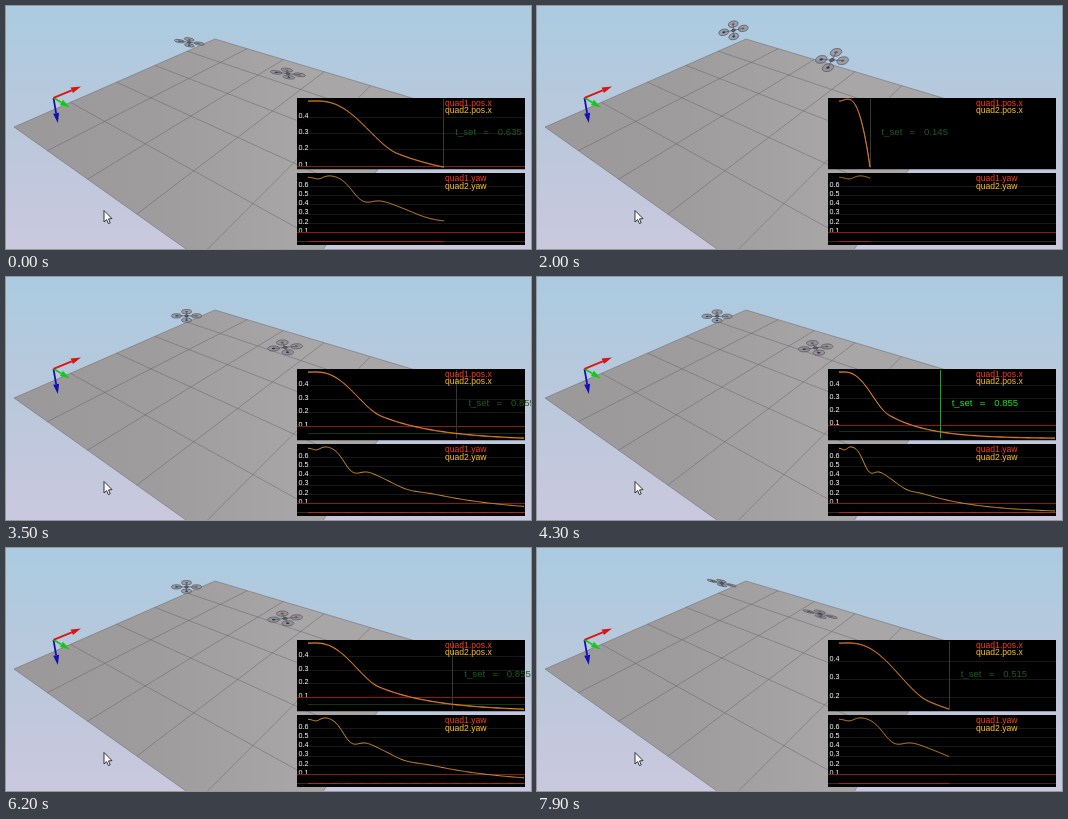
Recreate the animation shown at these times as an HTML page with a canvas. Size 525 by 243 pixels, loop 8000 ms.

```html
<!DOCTYPE html>
<html>
<head>
<meta charset="utf-8">
<title>Quadrotor step response</title>
<style>
html, body { margin: 0; width: 100%; height: 100%; overflow: hidden; background: #bccadd; }
canvas { display: block; }
</style>
</head>
<body>
<canvas id="c" width="525" height="243"></canvas>
<script>
const ctx = document.getElementById('c').getContext('2d');
const LOOP = 8000, STEP = 100;
const FONT = '"Liberation Sans", Arial, sans-serif';
const RED = '#ff3820', YELLOW = '#ffc21e', ORANGE = '#d9951f', LIMIT = '#8e1812', GRID = '#181818';
const SETTLED = 0.855, WINDOW = 1.01;

// each run: start in ms, simulated seconds per ms
const RUNS = [[-876, 725e-6], [1803, 730e-6], [4543, 769e-6], [7204, 740e-6]];

const smooth = s => { s = Math.min(Math.max(s, 0), 1); return s * s * (3 - 2 * s); };
const mix = (a, b, s) => a + (b - a) * s;
const dip = (t, at, width, depth) => -depth * Math.exp(-(((t - at) / width) ** 2));
const snap = v => Math.floor(v) + .5;

// both responses leave their start value and settle on an exponential tail
const pos = t => mix(.5, .6 * Math.exp(-2.9 * t), smooth(t / .42));
const yaw = t => mix(.7, .934 * Math.exp(-2.1 * t), smooth(t / .3))
  + dip(t, .05, .03, .03) + dip(t, .25, .065, .115) + dip(t, .57, .1, .03);

// lean forward to speed up, then back to brake
function pitch(t) {
  if (t < .3) return -.33 * Math.sin(Math.PI * t / .3);
  const u = (t - .3) / .17;
  return .35 * u * u * Math.exp(2 - 2 * u);
}

function line(x0, y0, x1, y1, color, width = 1) {
  ctx.strokeStyle = color;
  ctx.lineWidth = width;
  ctx.beginPath();
  ctx.moveTo(x0, y0);
  ctx.lineTo(x1, y1);
  ctx.stroke();
}

const level = (y, color, x = 291) => line(x, snap(y), 519, snap(y), color);

function poly(points, fill) {
  ctx.beginPath();
  points.forEach(p => ctx.lineTo(p[0], p[1]));
  ctx.closePath();
  ctx.fillStyle = fill;
  ctx.fill();
}

function text(str, x, y, size, color) {
  ctx.font = size + 'px ' + FONT;
  ctx.fillStyle = color;
  ctx.fillText(str, x, y);
}

function gradient(x, y, ...colors) {
  const g = ctx.createLinearGradient(0, 0, x, y);
  colors.forEach((color, i) => g.addColorStop(i / (colors.length - 1), color));
  return g;
}

// floor point in perspective; u runs to the left corner, v to the right one
function floorPoint(u, v) {
  const at = (top, left, right) => top + u * (left - top) + v * (right - top);
  const wl = .641, wr = .729, w = at(1, wl, wr);
  return [at(209, wl * 8, wr * 418) / w, at(33, wl * 121, wr * 95.6) / w];
}

function drawScene() {
  ctx.fillStyle = gradient(0, 243, '#abcbe0', '#bac8dc', '#cac8de');
  ctx.fillRect(0, 0, 525, 243);
  poly([floorPoint(0, 0), floorPoint(1, 0), floorPoint(1, 1), floorPoint(0, 1)],
    gradient(300, 0, '#9a9899', '#9e9c9d', '#a8a6a7'));
  for (let k = 0; k <= 1; k += .2) {
    line(...floorPoint(k, 0), ...floorPoint(k, 1), 'rgba(95,93,96,.55)', .8);
    line(...floorPoint(0, k), ...floorPoint(1, k), 'rgba(95,93,96,.55)', .8);
  }
}

function arrow(x, y, color) {
  const ox = 47.5, oy = 91.8, len = Math.hypot(x - ox, y - oy);
  const dx = (x - ox) / len, dy = (y - oy) / len;
  const bx = x - dx * 10, by = y - dy * 10;
  line(ox, oy, bx, by, color, 1.8);
  poly([[x, y], [bx - dy * 3, by + dx * 3], [bx + dy * 3, by - dx * 3]], color);
}

function drawCursor() {
  poly([[98, 204.5], [98, 216], [100.6, 213.6], [102.4, 217.6], [104.2, 216.8], [102.5, 212.9], [106, 212.6]], '#fff');
  ctx.strokeStyle = '#222';
  ctx.lineWidth = .9;
  ctx.stroke();
}

function drone(cx, cy, arm, heading, lean) {
  const c = Math.cos(lean), s = Math.sin(lean);
  const shape = (trace, stroke, width, fill) => {
    ctx.save();
    ctx.transform(.707 * c, -.3 * c + .9 * s, .707, .3, cx, cy);
    ctx.rotate(heading + Math.PI / 4);
    ctx.beginPath();
    trace();
    ctx.restore();
    if (fill) { ctx.fillStyle = fill; ctx.fill(); }
    if (stroke) { ctx.strokeStyle = stroke; ctx.lineWidth = width; ctx.stroke(); }
  };
  const disc = (x, y, r) => () => ctx.arc(x, y, r, 0, 7);
  const ends = [[arm, 0], [0, arm], [-arm, 0], [0, -arm]];

  for (const [x, y] of ends) shape(disc(x, y, arm / 2), '#62646b', .9, 'rgba(135,137,145,.65)');
  shape(() => {
    for (const [x, y] of ends) { ctx.moveTo(0, 0); ctx.lineTo(x, y); }
  }, '#5a5b62', .8);
  shape(disc(0, 0, arm * .2), '#44454c', .8, '#63656e');
  ends.forEach(([x, y], i) => shape(disc(x, y, arm * .15), null, 0, i % 3 ? '#2e3150' : '#85484a'));
}

function drawDrones(T) {
  const shift = pos(T) / .5, lean = pitch(T);
  drone(180 + 17.5 * shift, 39.4 - 16 * shift, 10, 0, lean);
  drone(278.5 + 17.5 * shift, 71 - 18 * shift, 11.8, yaw(T) - .3, lean);
}

function trace(T, px, py, color) {
  ctx.strokeStyle = color;
  ctx.lineWidth = 1;
  ctx.beginPath();
  for (let i = 0; i <= 200; i++) {
    const t = T * i / 200;
    ctx.lineTo(px(t), py(t));
  }
  ctx.stroke();
}

function legend(name, y) {
  text('quad1.' + name, 439, y, 8.6, RED);
  text('quad2.' + name, 439, y + 7.5, 8.6, YELLOW);
}

function tick(v, y, digits = 1) {
  level(y, GRID);
  text(v.toFixed(digits), 292.5, y + .3, 7.2, '#fff');
}

function panel(y, h, paint) {
  ctx.save();
  ctx.beginPath();
  ctx.rect(291, y, 228, h);
  ctx.clip();
  ctx.fillStyle = '#000';
  ctx.fillRect(291, y, 228, h);
  paint();
  ctx.restore();
}

function drawPlots(T) {
  const px = t => 302 + 216 * t / Math.max(T, WINDOW);
  const bright = T > SETTLED + .5;
  const mark = px(Math.min(T, SETTLED));

  panel(92, 71.5, () => {
    // the lower limit follows the curve
    const low = pos(T), range = Math.max(.5 - low, .004);
    const y = v => 95 + (.5 - v) / range * 66;
    const step = range > .2 ? .1 : .05;
    for (let v = .5 - step; v > low && v > .01; v -= step) tick(v, y(v), step < .1 ? 2 : 1);
    level(y(.1), LIMIT);
    level(y(.05), '#123412', 302);
    line(snap(mark), 93, snap(mark), 161.5, bright ? '#0cae10' : '#303c30');
    trace(T, px, t => y(pos(t)) + .4, '#c83a1c');
    trace(T, px, t => y(pos(t)), ORANGE);
    legend('pos.x', 99.5);
  });

  panel(167, 72, () => {
    const y = v => 235.8 - v * 92.5;
    for (let v = .1; v < .65; v += .1) tick(v, y(v));
    level(y(.1), LIMIT);
    level(y(0), '#3c2a1c');
    trace(T, px, () => snap(y(0)), '#c02a1c');
    trace(T, px, t => y(yaw(t)), ORANGE);
    legend('yaw', 175);
  });

  const green = bright ? '#12e612' : '#1d5c22';
  text('t_set', mark + 11.5, 128.8, 9.6, green);
  text('=', mark + 39.5, 128.8, 9.6, green);
  text(Math.min(T, SETTLED).toFixed(3), mark + 54, 128.8, 9.6, green);
}

function draw(ms) {
  const now = Math.floor(ms % LOOP / STEP) * STEP;
  const [start, rate] = RUNS.filter(r => r[0] <= now).pop();
  const T = Math.round((now - start) * rate * 200) / 200;
  drawScene();
  drawDrones(T);
  arrow(51.8, 117, '#1010b4');
  arrow(64, 101.5, '#18c818');
  arrow(75, 80.5, '#dc1414');
  drawPlots(T);
  drawCursor();
}

let origin = null;
function loop(now) {
  if (origin === null) origin = now;
  draw(now - origin);
  requestAnimationFrame(loop);
}
draw(0);
requestAnimationFrame(loop);
</script>
</body>
</html>
```
